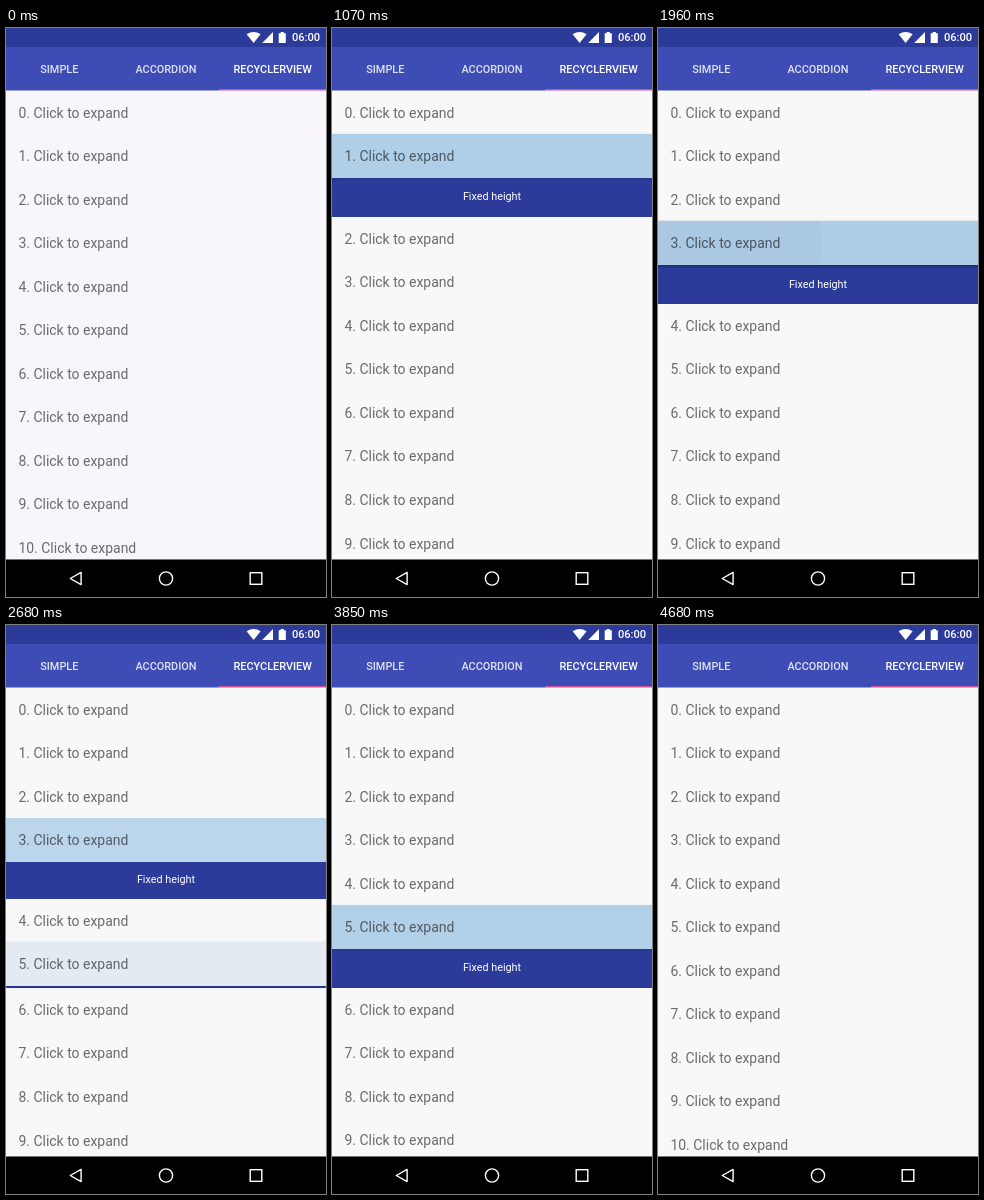
Recreate the animation shown at these times as an HTML page. Size 320 px wide and 569 px high, loop 4700 ms.

```html
<!DOCTYPE html>
<html lang="en">
<head>
<meta charset="utf-8">
<title>Expandable list</title>
<style>
  :root { --loop: 4700ms; --row: 43.56px; --open: 39.1px; }
  html, body { margin: 0; width: 100%; height: 100%; overflow: hidden; }
  body { position: relative; font-family: Roboto, sans-serif; background: #000; }

  .status, .tabs, .list, .nav { position: absolute; left: 0; width: 320px; }
  .status { top: 0; height: 19px; background: #2c3a9a; }
  .status svg, .nav svg { position: absolute; left: 0; top: 0; }
  .clock {
    position: absolute; left: 286px; top: 0; line-height: 20px;
    font-size: 11.1px; font-weight: 500; color: #fff;
  }

  .tabs { top: 19px; height: 43px; z-index: 1; display: flex; background: #3e4db5; }
  .tabs div {
    flex: 1; text-align: center; line-height: 45px;
    font-size: 10.9px; font-weight: 500; color: #e0e2f3;
  }
  .tabs .on { color: #fff; box-shadow: inset 0 -1px #d0509c; }
  /* soft lower edge of the bar and its indicator */
  .tabs::after {
    content: ""; position: absolute; left: 0; top: 100%; width: 100%; height: 1px;
    background: linear-gradient(90deg, #3e4db5 66.67%, #d0509c 0); opacity: .5;
  }

  .list {
    top: 62px; height: 469.5px; padding-top: .5px; overflow: hidden;
    background: #f8f8f8; animation: paper var(--loop) infinite step-end;
  }
  .row { position: relative; height: var(--row); }
  .row p {
    position: absolute; left: 12.4px; top: 1px; margin: 0; white-space: nowrap;
    line-height: var(--row); font-size: 13.97px; color: rgba(0, 0, 0, .57);
  }
  .pick { z-index: 1; animation: var(--tint) var(--loop) infinite linear; }

  .panel {
    position: relative; height: 0; overflow: hidden; background: #2c3a9a;
    animation: var(--grow) var(--loop) infinite cubic-bezier(.364, 0, .636, 1);
  }
  .panel span {
    position: absolute; left: 0; width: 100%; top: max(8.5px, calc(50% + .3px));
    transform: translateY(-50%); text-align: center;
    font-size: 10.8px; line-height: 14px; color: #fff;
  }

  .tap {
    position: absolute; inset: 0; overflow: hidden;
    animation: lift var(--loop) var(--at) infinite linear;
  }
  .tap::before {
    content: ""; position: absolute; left: 33px; top: -18px;
    width: 80px; height: 80px; border-radius: 50%; background: #203050; opacity: 0;
    animation: ripple var(--loop) var(--at) infinite linear;
  }

  .nav { top: 531px; height: 38px; background: linear-gradient(#0008 1px, #000 0); }

  @keyframes paper { 0% { background: #f8f6fa; } 21.7%, 100% { background: #f8f8f8; } }

  @keyframes grow1 {
    0%, 10.234% { height: 0; } 16.617%, 33.085% { height: var(--open); } 39.468%, 100% { height: 0; }
  }
  @keyframes grow3 {
    0%, 33.085% { height: 0; } 39.468%, 56.064% { height: var(--open); } 62.447%, 100% { height: 0; }
  }
  @keyframes grow5 {
    0%, 56.064% { height: 0; } 62.447%, 81.596% { height: var(--open); } 87.979%, 100% { height: 0; }
  }

  @keyframes tint1 {
    0%, 10.234% { background: #b0cfe900; } 14.277%, 33.085% { background: #b0cfe9; } 39.468%, 100% { background: #b0cfe900; }
  }
  @keyframes tint3 {
    0%, 33.085% { background: #b0cfe900; } 37.128%, 56.064% { background: #b0cfe9; } 62.447%, 100% { background: #b0cfe900; }
  }
  @keyframes tint5 {
    0%, 56.064% { background: #b0cfe900; } 60.106%, 81.596% { background: #b0cfe9; } 87.979%, 100% { background: #b0cfe900; }
  }

  @keyframes lift {
    0% { box-shadow: 0 1px 3px #0000; background: #0000; }
    2% { box-shadow: 0 1px 3px #0004; background: #00000008; }
    4.5%, 9% { box-shadow: 0 1px 3px #0006; background: #00000003; }
    15%, 100% { box-shadow: 0 1px 3px #0000; background: #0000; }
  }
  @keyframes ripple {
    0%, 2.3% { transform: scale(.3); opacity: 0; }
    4.6% { transform: scale(.87); opacity: .09; }
    8.6% { transform: scale(2.25); opacity: .03; }
    11.06%, 100% { transform: scale(3.4); opacity: 0; }
  }
</style>
</head>
<body>
  <div class="status">
    <svg width="320" height="19" fill="#fff">
      <path d="M247.6 15 240.6 6.3Q247.6 1.7 254.6 6.3Z"/>
      <path d="M267 4V15H256.2Z"/>
      <path d="M272.7 5.2H274.7V4H277.8V5.2H279.8V15H272.7Z"/>
    </svg>
    <div class="clock">06:00</div>
  </div>

  <div class="tabs">
    <div>SIMPLE</div>
    <div>ACCORDION</div>
    <div class="on">RECYCLERVIEW</div>
  </div>

  <div class="list"></div>

  <div class="nav">
    <svg width="320" height="38" fill="none" stroke="#fff" stroke-width="1.4">
      <path d="M64.3 19.5 75.1 13.4V25.6Z" stroke-linejoin="round"/>
      <circle cx="160" cy="19.5" r="6.6"/>
      <rect x="244.2" y="13.7" width="11.6" height="11.6"/>
    </svg>
  </div>

<script>
  // Tap times in ms for each row that opens or closes by touch
  const taps = { 1: [481], 3: [1555], 5: [2635, 3835] };

  const rowHtml = i => {
    const label = `<p>${i}. Click to expand</p>`;
    if (!taps[i]) return `<div class="row">${label}</div>`;
    const marks = taps[i].map(ms => `<i class="tap" style="--at:${ms}ms"></i>`).join('');
    return `<div class="row pick" style="--tint:tint${i}">${marks}${label}</div>
      <div class="panel" style="--grow:grow${i}"><span>Fixed height</span></div>`;
  };

  document.querySelector('.list').innerHTML = Array.from({ length: 11 }, (_, i) => rowHtml(i)).join('');
</script>
</body>
</html>
```
